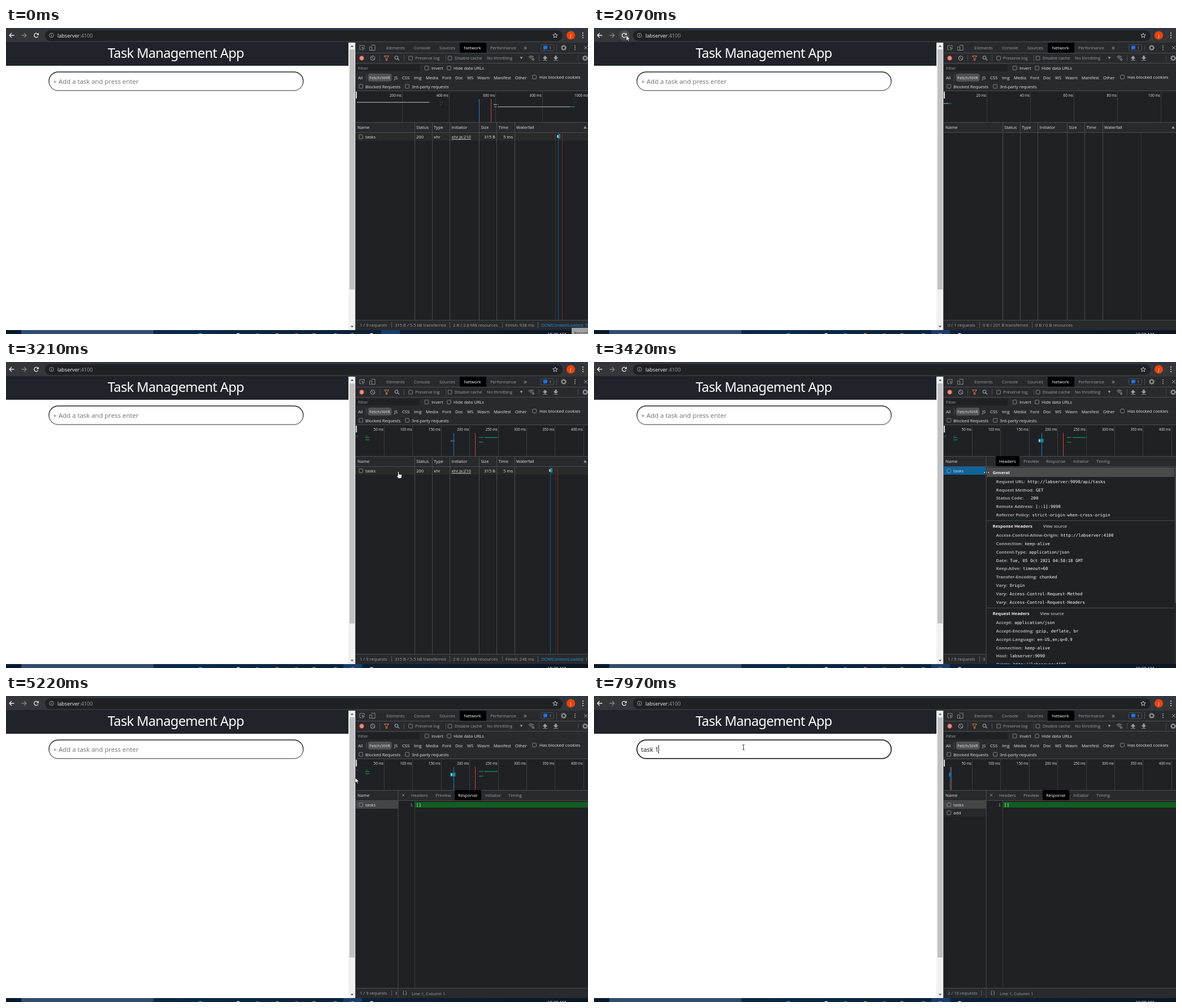
Animation, 1030 px wide and 543 px high, one loop 8000 ms. Source, as an HTML page with a canvas:

```html
<!DOCTYPE html>
<html lang="en">
<head>
<meta charset="utf-8">
<title>Task app with network panel</title>
<style>
html, body { margin: 0; width: 100%; height: 100%; overflow: hidden; background: #fff; }
canvas { display: block; }
</style>
</head>
<body>
<canvas id="stage" width="1030" height="543"></canvas>
<script>
const ctx = document.getElementById('stage').getContext('2d');
const LOOP = 8000;
const UI = "'Open Sans', 'Noto Sans', sans-serif";
const MONO = "'DejaVu Sans Mono', monospace";
const HOST = 'labserver', SITE = HOST + ':4100', API = HOST + ':9090';
const BAR = '#292a2d', DARK = '#202124', EDGE = '#494c50', GREY = '#9aa0a6', PALE = '#e3e5e8';
const BLUE = '#1a86c0', RED = '#d0463a', GREEN = '#0d7c46';

// Pointer path: time, x, y
const PATH = [
  [310, 885, 484], [640, 443, 176], [840, 443, 176], [1380, 6, 9], [1600, 57, 13],
  [2550, 57, 13], [2740, 699, 188], [3340, 694, 196], [3750, 694, 196],
  [4150, 866, 184], [4490, 823, 176], [5020, 823, 176], [5510, 264, 91], [8000, 264, 91]
];
const CLICKS = [[1660, 1730], [3340, 3420], [4620, 4690], [5720, 5780]];
const KEYS = [6440, 6640, 6780, 7110, 7310, 7510];

function rect(x, y, w, h, color) { ctx.fillStyle = color; ctx.fillRect(x, y, w, h); }
function disc(x, y, r, color) {
  ctx.beginPath(); ctx.arc(x, y, r, 0, 7); ctx.fillStyle = color; ctx.fill();
}
function ring(x, y, r, color, width = 1, from = 0, to = Math.PI * 2) {
  ctx.beginPath(); ctx.arc(x, y, r, from, to);
  ctx.strokeStyle = color; ctx.lineWidth = width; ctx.stroke();
}
function pill(x, y, w, h, r, fill, stroke, width = 1) {
  ctx.beginPath(); ctx.roundRect(x, y, w, h, r);
  if (fill) { ctx.fillStyle = fill; ctx.fill(); }
  if (stroke) { ctx.strokeStyle = stroke; ctx.lineWidth = width; ctx.stroke(); }
}
function path(d, x, y, stroke, fill, width = 1) {
  const shape = new Path2D(d);
  ctx.save(); ctx.translate(x, y); ctx.lineWidth = width;
  if (fill) { ctx.fillStyle = fill; ctx.fill(shape); }
  if (stroke) { ctx.strokeStyle = stroke; ctx.stroke(shape); }
  ctx.restore();
}
// y is the middle of the capitals; returns the right end
function text(s, x, y, color = GREY, size = 7.6, weight = 400, family = UI, align = 'left') {
  ctx.font = `${weight} ${size}px ${family}`;
  ctx.textAlign = align; ctx.fillStyle = color;
  ctx.fillText(s, x, y + size * 0.36);
  return x + ctx.measureText(s).width;
}
function box(x, y) { pill(x - 3.2, y - 3.4, 6.6, 6.8, 1, null, '#8b8f94', 0.9); }
function gear(x, y) {
  ring(x, y, 3, GREY, 1.5);
  ctx.setLineDash([1.5, 1.6]); ring(x, y, 4.4, GREY, 1.3); ctx.setLineDash([]);
}
function dots(x, y, gap, color) { for (const k of [-1, 0, 1]) disc(x, y + k * gap, 1, color); }

function browserBar(p) {
  rect(0, 0, 1030, 26, '#35363a');
  rect(165, 0, 865, 1, '#17406b');
  if (p && p.y < 26 && p.x < 65) disc(p.x < 22 ? 10 : p.x < 43 ? 32 : 54, 13, 9.5, '#4b4c50');
  path('M4.5 0H-4M0-4L-4 0L0 4', 10, 13, '#e8eaed', null, 1.3);
  path('M-4.5 0H4M0-4L4 0L0 4', 32, 13, '#82858a', null, 1.3);
  ring(53.5, 13, 3.7, '#e8eaed', 1.3, 0.5, 5.5);
  path('M4.5-4.5V-.4H.4Z', 53.5, 13, null, '#e8eaed');
  pill(69, 4, 916, 19, 9.5, DARK);
  ring(80.5, 13, 3.8, GREY, 0.9);
  rect(80, 12.3, 1, 3, GREY); rect(80, 10.5, 1, 1, GREY);
  const end = text(HOST, 91, 13.3, '#f1f3f4', 9.05);
  text(SITE.slice(HOST.length), end, 13.3, GREY, 9.05);
  path('M0-4.2L1.2-1.3L4.3-1.1L1.9 .9L2.7 3.9L0 2.2L-2.7 3.9L-1.9 .9L-4.3-1.1L-1.2-1.3Z', 972, 13.2, '#d0d2d5', null, 0.9);
  disc(999.5, 13, 7.6, '#e8440e');
  text('J', 999.5, 13.2, '#fff', 8, 400, UI, 'center');
  dots(1021, 13, 4, '#e8eaed');
}

function taskPage(t) {
  rect(0, 25, 606, 511, '#fff');
  rect(0, 25, 606, 42, '#20232a');
  ctx.letterSpacing = '-0.65px';
  text('Task Management App', 180, 44.7, '#fff', 23.6, 400, "'Noto Sans', sans-serif");
  ctx.letterSpacing = '0px';
  const focused = t >= 5720;
  let border = '#050505';
  if (!focused) {
    border = ctx.createLinearGradient(0, 78, 0, 111);
    border.addColorStop(0.45, '#20202c'); border.addColorStop(0.8, '#747478');
  }
  pill(76, 78, 450, 33, 16.5, '#fff', border, focused ? 1.5 : 1.35);
  const typed = 'task 1'.slice(0, KEYS.filter(k => t >= k).length);
  let end = 83.2;
  if (typed) end = text(typed, 83.2, 95.2, '#161616', 11.4);
  else text('+ Add a task and press enter', 83.6, 95.2, '#6f6f6f', 11.4);
  if (focused && (t < 6240 || typed)) rect(Math.floor(end), 87, 1, 15, '#222');
  rect(606, 26, 12, 510, '#f1f1f1');
  rect(608, 38, 9, 426, '#c1c1c1');
  path('M-2.6 1.5L0-1.5L2.6 1.5Z', 612.5, 32, null, '#505050');
  path('M-2.6-1.5L0 1.5L2.6-1.5Z', 612.5, 530, null, '#505050');
}

function taskbar(t) {
  const g = ctx.createLinearGradient(0, 0, 1030, 0);
  g.addColorStop(0, '#07192c'); g.addColorStop(0.3, '#0b2a47'); g.addColorStop(1, '#0b1624');
  rect(0, 536, 1030, 7, g);
  rect(27, 536, 234, 7, '#304d6c');
  rect(t < 1660 ? 664 : 597, 536, 33, 7, '#173d70');
  [['#28b5c7', 344], ['#e8e8e8', 411], ['#2b7fd0', 445], ['#d9822b', 480], ['#c44a1c', 514],
   ['#e07a3a', 545], ['#2d9fd0', 583], ['#d06a2a', 613], ['#d8dde4', 647]]
    .forEach(([color, x]) => disc(x, 546, 4.5, color));
  text('10:28 AM', 958, 543.2, '#eef2f5', 7.6);
  if (t < 70) {
    rect(1001, 532, 29, 11, '#9fa1a3');
    text('Recording', 1005, 541, '#33363a', 7.6);
  }
}

function toolbars() {
  rect(618, 26, 412, 510, DARK);
  rect(618, 26, 412, 86, BAR);
  rect(803, 26, 47, 18, '#000');
  for (const y of [44, 62, 111]) rect(618, y, 412, 1, EDGE);
  path('M-1 3.5H-4V-4H4V-1M0-1L4.6 1L2.6 2L1.6 4.4Z', 630, 35, GREY, null, 0.8);
  path('M-2-4.5H4.5V4.5H-1M-5-1.5H-1V4.5H-5Z', 648.5, 35, GREY, null, 0.8);
  [['Elements', 673], ['Console', 722], ['Sources', 767], ['Performance', 857]]
    .forEach(([s, x]) => text(s, x, 35.2));
  text('Network', 810.5, 35.2, '#fff');
  text('»', 916, 34.4, GREY, 12);
  pill(946.5, 29.5, 23, 11, 2, null, EDGE);
  pill(951, 31.5, 7, 6, 1, '#1a73e8');
  path('M0 0V3L3 0Z', 952, 36.5, null, '#1a73e8');
  text('1', 961, 35.2);
  rect(974, 29, 1, 12, EDGE);
  gear(987, 35); dots(1007, 35, 3.3, GREY);
  path('M-3-3L3 3M3-3L-3 3', 1026, 35, GREY);

  ring(629.5, 53.5, 4, '#8d3f3b', 1.5); disc(629.5, 53.5, 3.4, '#f28b7c');
  ring(649, 53.5, 3.7, GREY, 1.1); path('M-2.6-2.6L2.6 2.6', 649, 53.5, GREY);
  for (const x of [661, 704, 778, 943, 1012]) rect(x, 48, 1, 11, EDGE);
  path('M-4-3.8H4L1 0V4H-1V0Z', 673.5, 53.5, '#e8794f');
  ring(691, 52.5, 2.8, GREY, 1.1); path('M2 2L5 5', 691, 52.5, GREY, null, 1.2);
  box(716, 53.5); text('Preserve log', 724, 53.6);
  box(785.5, 53.5); text('Disable cache', 794, 53.6);
  text('No throttling', 851, 53.6);
  path('M-2.3-2H2.3L0 2Z', 912, 53.3, null, GREY);
  for (const r of [2, 4.2, 6.4]) ring(929.5, 56, r, GREY, 1, -2.4, -0.75);
  ring(933, 56, 1.6, GREY, 1);
  path('M0-4L3.6 0H1.2V2.4H-1.2V0H-3.6ZM-4 4H4', 954, 53.5, GREY, GREY, 0.8);
  path('M0 2.8L3.6-1H1.2V-4H-1.2V-1H-3.6ZM-4 4H4', 973, 53.5, GREY, GREY, 0.8);
  gear(1025, 53.5);

  rect(620, 65, 112, 12, DARK);
  text('Filter', 623, 71.5);
  box(744.5, 71); text('Invert', 753, 71.5, PALE);
  box(784, 71); text('Hide data URLs', 792, 71.5, PALE);
  pill(640.5, 81, 42, 14, 4, '#505356');
  rect(637, 82, 1, 12, EDGE);
  [['All', 623], ['Fetch/XHR', 643], ['JS', 687], ['CSS', 701], ['Img', 722], ['Media', 743],
   ['Font', 772], ['Doc', 795], ['WS', 816], ['Wasm', 834], ['Manifest', 863], ['Other', 901]]
    .forEach(([s, x]) => text(s, x, 88, PALE));
  box(935, 87); text('Has blocked cookies', 944, 87.5, PALE, 7.7);
  box(628, 103.5); text('Blocked Requests', 636, 103.8, PALE);
  box(710, 103.5); text('3rd-party requests', 718, 103.8, PALE);
}

function ruler(first, gap, step) {
  for (let i = 0; first + i * gap < 1034; i++) {
    const x = first + i * gap;
    rect(Math.round(x), 113, 1, 54, '#3a3c40');
    text((i + 1) * step + ' ms', x - 1, 119.7, PALE, 6.2, 400, UI, 'right');
  }
}

function overview(t) {
  rect(619, 113, 2, 12, '#d8dadd');
  const marks = (a, b) => { rect(a, 126, 1, 41, BLUE); rect(b, 126, 1, 41, RED); };
  if (t < 1730) {
    ruler(701, 82.6, 200);
    rect(621, 131, 128, 1.6, '#85888c'); rect(750, 131, 2, 1.6, '#3d4346');
    rect(767, 131, 6, 1.3, '#23443a'); rect(768, 135, 2, 1.3, '#23443a');
    marks(837, 858);
    rect(863, 135, 6, 1.6, '#858b8c'); rect(870, 135, 2, 1.6, '#2a5950');
    rect(864, 139, 4, 1.6, '#6f7477'); rect(870, 139, 129, 1.6, '#85888c');
    rect(1000, 139, 6, 1.6, '#16788b'); rect(1005, 131, 4, 1.3, '#23443a');
  } else if (t < 2210) {
    ruler(695, 77, 20);
    if (t > 1930) { rect(619, 133, 8, 1.6, '#6d8b91'); rect(627, 133, 6, 1.6, '#1a5e62'); }
  } else if (t < 7970) {
    ruler(669, 50.4, 50);
    rect(618, 131, 5, 1.5, '#175a6d');
    rect(636, 131, 4, 1.2, '#176044'); rect(636, 133.4, 7, 1.6, GREEN); rect(636, 137.4, 7, 1.6, GREEN);
    marks(792, 830);
    if (t >= 3340) { rect(786, 136, 10, 7, '#0e639c'); rect(787.5, 137.5, 2, 4, PALE); rect(791, 137, 3, 5, '#1fa85c'); }
    else { rect(787, 139.4, 3, 1.4, '#78909c'); rect(790, 139.4, 4, 1.4, BLUE); }
    for (const y of [133, 141.5]) { rect(837, y, 3, 1.5, '#7d5751'); rect(840, y, 5, 1.5, GREEN); }
    rect(847, 133, 23, 1.8, GREEN);
  } else {
    ruler(669, 50.4, 50);
    marks(630, 632);
    rect(628, 136, 5, 7, '#0f6d9c');
  }
  rect(618, 167, 412, 1, EDGE);
}

function requestTable(t) {
  rect(618, 168, 412, 17, BAR); rect(618, 185, 412, 1, EDGE);
  [['Name', 622], ['Status', 726], ['Type', 757], ['Initiator', 788.5], ['Size', 840.5], ['Time', 871.5], ['Waterfall', 903]]
    .forEach(([s, x]) => text(s, x, 176.7, PALE));
  path('M-2.8 2L0-2.4L2.8 2Z', 1025, 176.5, null, GREY);
  const early = t < 1730, loaded = early || t >= 2210;
  const selected = t >= 3340;
  if (loaded) rect(618, 186, 412, 14, selected ? '#0e639c' : '#292a2a');
  for (const x of [723, 754, 785, 837, 868, 900]) rect(x, 168, 1, 350, EDGE);
  rect(loaded ? 972 : 968, 186, 1, 332, '#303236');
  if (loaded) {
    const ink = selected ? '#fff' : PALE, dom = early ? 977 : 963;
    box(628, 193); text('tasks', 636, 193.5, ink);
    text('200', 726, 193.5, ink); text('xhr', 757, 193.5, ink);
    const end = text('xhr.js:210', 788.5, 193.5, ink);
    rect(788.5, 197.3, end - 788.5, 0.8, ink);
    text('315 B', 866, 193.5, ink, 7.6, 400, UI, 'right');
    text('5 ms', 897, 193.5, ink, 7.6, 400, UI, 'right');
    rect(dom, 186, 1, 332, '#17587f'); rect(early ? 984 : 976, 186, 1, 332, '#7a2420');
    rect(dom - 1.5, 190, 2, 5, PALE); rect(dom + 1.5, 188, 2.3, 8.5, early ? BLUE : '#1798a8');
  }
  rect(618, 518, 412, 18, BAR); rect(618, 518, 412, 1, EDGE);
  const status = loaded
    ? [['1 / 9 requests', 626], ['315 B / 5.5 kB transferred', 688], ['2 B / 2.8 MB resources', 791], [`Finish: ${early ? 938 : 248} ms`, 884]]
    : [['0 / 1 requests', 626], ['0 B / 201 B transferred', 688], ['0 B / 0 B resources', 781]];
  status.forEach(([s, x], i) => {
    text(s, x, 527.3, GREY, 7.65);
    if (i) rect(x - 6, 522, 1, 10, '#5a5d61');
  });
  if (loaded) {
    rect(941, 522, 1, 10, '#5a5d61');
    text(`DOMContentLoaded: ${early ? '526' : '173'} ms`, 947.5, 527.3, '#1a9be0', 7.65);
  }
}

function headersPane() {
  const title = (s, y, linkX) => {
    text(s, 705.5, y, '#f1f1f1', 7.7, 700);
    if (linkX) { rect(695, Math.round(y - 10), 332, 1, EDGE); text('View source', linkX, y, PALE); }
  };
  const pairs = (y, rows) => rows.forEach(([key, value], i) => {
    const end = text(key + ':', 711.5, y + i * 14.8, '#a3a8ad', 7.85, 700);
    text(value, key === 'Status Code' ? 773 : end + 4, y + i * 14.8 + 0.2, '#fff', 7.4, 400, MONO);
  });
  rect(695, 187, 332, 17, '#4a4b4d');
  title('General', 195.8);
  pairs(212, [['Request URL', `http://${API}/api/tasks`], ['Request Method', 'GET'], ['Status Code', '200'],
    ['Remote Address', '[::1]:9090'], ['Referrer Policy', 'strict-origin-when-cross-origin']]);
  title('Response Headers', 291.2, 795);
  pairs(307.4, [['Access-Control-Allow-Origin', `http://${SITE}`], ['Connection', 'keep-alive'],
    ['Content-Type', 'application/json'], ['Date', 'Tue, 05 Oct 2021 04:58:18 GMT'], ['Keep-Alive', 'timeout=60'],
    ['Transfer-Encoding', 'chunked'], ['Vary', 'Origin'], ['Vary', 'Access-Control-Request-Method'],
    ['Vary', 'Access-Control-Request-Headers']]);
  title('Request Headers', 446, 789.5);
  pairs(462.3, [['Accept', 'application/json'], ['Accept-Encoding', 'gzip, deflate, br'],
    ['Accept-Language', 'en-US,en;q=0.9'], ['Connection', 'keep-alive'], ['Host', API], ['Origin', `http://${SITE}`]]);
  rect(1027, 186, 3, 350, BAR);
  rect(1028, 187, 2, 240, '#46484b');
}

function detailPane(t) {
  const response = t >= 4620, added = t >= 7970;
  rect(618, 168, 412, 368, DARK);
  rect(618, 168, 412, 17, BAR);
  rect(618, 185, 412, 1, EDGE);
  text('Name', 622, 176.7, PALE);
  rect(619, 186, 75, 14, response ? '#454545' : '#0e639c');
  box(628, 193); text('tasks', 636, 193.5, PALE);
  if (added) { rect(619, 200, 75, 14, '#272829'); box(628, 207.3); text('add', 636, 207.7, PALE); }
  rect(618, 518, 76, 18, BAR); rect(618, 518, 76, 1, EDGE);
  text(added ? '2 / 10 requests' : '1 / 9 requests', 626, 527.3, GREY, 7.65);
  rect(added ? 685 : 682, 522, 1, 10, '#5a5d61');
  if (!added) text('3', 688, 527.3, GREY, 7.65);
  if (t >= 3490) path('M-2.2-2.2L2.2 2.2M2.2-2.2L-2.2 2.2', 703, 176, GREY, null, 0.8);
  if (response) rect(794, 167, 47, 18, '#000'); else rect(711, 167, 42, 18, '#000');
  [['Headers', 717], ['Preview', 760], ['Response', 800], ['Initiator', 848], ['Timing', 889]]
    .forEach(([s, x], i) => text(s, x, 176.2, i === (response ? 2 : 0) ? '#fff' : GREY));
  if (!response) headersPane();
  else if (t >= 4690) {
    rect(723, 186, 1, 332, '#3a3c40');
    rect(723, 188, 307, 10, '#125d22');
    text('1', 715.5, 193.4, GREY, 7.4, 400, MONO);
    text('[]', 726, 193.2, '#f0f1f2', 7.4, 400, MONO);
    rect(695, 518, 335, 18, BAR); rect(695, 518, 335, 1, EDGE);
    text('{}', 701, 527.5, GREY, 8, 400, MONO);
    text('Line 1, Column 1', 718, 528, GREY, 7.65);
  }
  rect(693.5, 167, 1, 369, EDGE);
}

function pointerAt(t) {
  if (t < PATH[0][0]) return null;
  const i = Math.max(1, PATH.findIndex(p => p[0] > t));
  const [t0, x0, y0] = PATH[i - 1], [t1, x1, y1] = PATH[i];
  const u = (t - t0) / (t1 - t0), e = u * u * (3 - 2 * u);
  return { x: x0 + (x1 - x0) * e, y: y0 + (y1 - y0) * e };
}

function pointer(t, p) {
  if (!p) return;
  if (CLICKS.some(([a, b]) => t >= a && t < b)) disc(p.x, p.y, 8.2, 'rgba(208,198,10,.85)');
  const inInput = p.x > 76 && p.x < 526 && p.y > 78 && p.y < 111;
  const onRow = t < 3420 && t >= 2210 && p.x > 618 && p.y > 185 && p.y < 200;
  if (t >= 3420 && t < 3750) {
    path('M-5.5 0L-2.5-2.6V2.6ZM5.5 0L2.5-2.6V2.6ZM-.7-3H.7V3H-.7Z', p.x + 0.5, p.y, '#000', '#fff', 0.7);
  } else if (inInput) {
    path('M-2-4.5H-.5L0-4L.5-4.5H2M0-4V4M-2 4.5H-.5L0 4L.5 4.5H2', p.x + 0.5, p.y, '#222', null, 0.9);
  } else if (onRow) {
    path('M-1 0Q0-1.2 1 0V4L5.5 5Q6.4 5.4 6 7L5 11.5H0L-3 7.5Q-3.2 6-1 7Z', p.x, p.y, '#111', '#fff', 0.7);
  } else {
    path('M0 0V9.5L2.2 7.5L3.7 11L5.2 10.3L3.7 7H6.7Z', p.x, p.y, '#111', '#fff', 0.7);
  }
}

function draw(now) {
  const t = now % LOOP, p = pointerAt(t);
  browserBar(p);
  taskPage(t);
  toolbars();
  overview(t);
  if (t < 3420) requestTable(t); else detailPane(t);
  rect(618, 26, 1, 510, EDGE);
  taskbar(t);
  pointer(t, p);
  requestAnimationFrame(draw);
}
requestAnimationFrame(draw);
</script>
</body>
</html>
```
